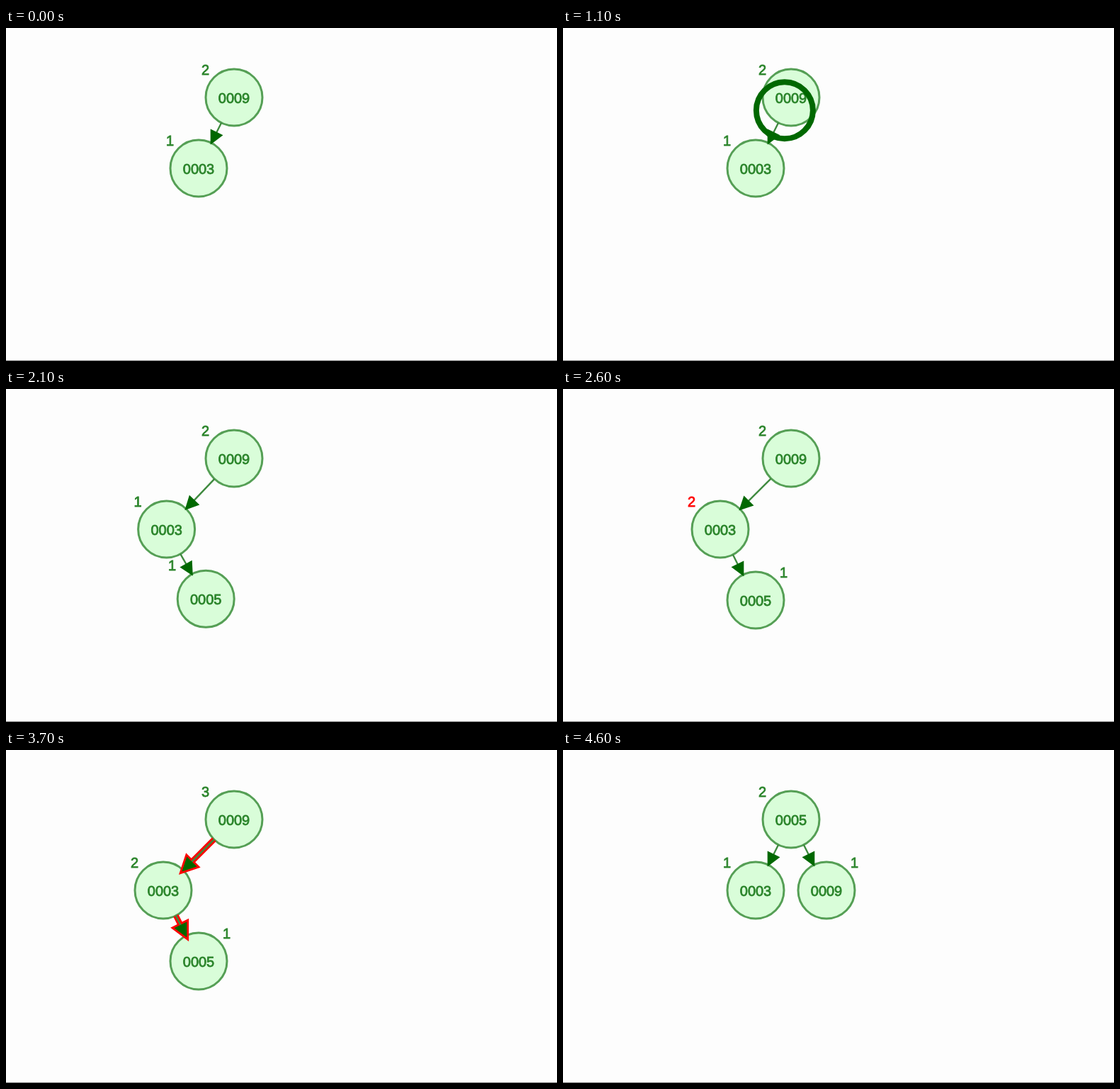
Animation, 778 px wide and 470 px high, one loop 5 s. Source, as an HTML page with a canvas:

```html
<!DOCTYPE html>
<html lang="en">
<head>
<meta charset="utf-8">
<title>Tree insertion with double rotation</title>
<style>
  html, body { margin: 0; width: 100%; height: 100%; overflow: hidden; background: #fdfdfd; }
  canvas { display: block; }
</style>
</head>
<body>
<canvas id="stage" width="778" height="470"></canvas>
<script>
const ctx = document.getElementById('stage').getContext('2d');
const LOOP = 5000, TICK = 100, BLOCK = 367, STEPS = 11, RADIUS = 40;
const PAPER = '#fdfdfd', DARK = '#006800', LINE = '#3f8a3f', OUTLINE = '#559f55',
      FILL = '#d9fdd9', TEXT = '#2a842a', RED = '#ff0000';

// Start of each animation block
const ROOT_LIT = 667, DESCEND = 1033, CHILD_LIT = 1400, INSERT = 1767, CLIMB = 2133,
      CHILD_HEIGHT = 2500, CLIMB_ROOT = 2867, ROOT_HEIGHT = 3233, EDGES_LIT = 3600, ROTATE = 4000;

// Tree slots
const ROOT = [322, 98], LEFT = [272, 198], RIGHT = [372, 198], FAR_LEFT = [222, 198], INNER = [272, 298];
const ENTRY = [-618, 98], LABEL_ENTRY = [-518, 158];

const progress = (t, start) => Math.min(1, Math.max(0, (t - start) / BLOCK));
const during = (t, start) => t >= start && t < start + BLOCK;
const mix = (a, b, p) => a.map((v, i) => v + (b[i] - v) * p);
const labelLeft = ([x, y]) => [x - 40.5, y - 40];
const labelRight = ([x, y]) => [x + 39.5, y - 40];

// The new node is pulled to its first slot and to its final slot in every step.
function insertedAt(p) {
  let pos = ENTRY;
  const count = Math.round(p * STEPS);
  for (let i = 0; i < count; i++) {
    const f = 1 / (STEPS - i);
    pos = mix(mix(pos, [322, 298], f), INNER, f);
  }
  return pos;
}

function write(text, [x, y], color = TEXT) {
  ctx.fillStyle = ctx.strokeStyle = color;
  ctx.lineWidth = 0.8;
  ctx.fillText(text, x, y + 7.5);
  ctx.strokeText(text, x, y + 7.5);
}

function circle([x, y], radius) {
  ctx.beginPath();
  ctx.arc(x, y, radius, 0, Math.PI * 2);
}

function drawNode(pos, text, glow) {
  if (glow) {
    circle(pos, RADIUS + 1 + glow);
    ctx.fillStyle = RED;
    ctx.fill();
  }
  circle(pos, RADIUS);
  ctx.fillStyle = FILL;
  ctx.fill();
  ctx.strokeStyle = OUTLINE;
  ctx.lineWidth = 3;
  ctx.stroke();
  write(text, [pos[0], pos[1] + 0.5]);
}

function strokeArrow(from, to, width, lineColor, headColor) {
  const angle = Math.atan2(to[1] - from[1], to[0] - from[0]);
  ctx.lineWidth = width;
  ctx.strokeStyle = lineColor;
  ctx.beginPath();
  ctx.moveTo(...from);
  ctx.lineTo(...to);
  ctx.stroke();
  ctx.save();
  ctx.translate(...to);
  ctx.rotate(angle);
  ctx.beginPath();
  ctx.moveTo(0, 0);
  ctx.lineTo(-16, -8);
  ctx.lineTo(-16, 8);
  ctx.closePath();
  ctx.fillStyle = ctx.strokeStyle = headColor;
  ctx.fill();
  ctx.stroke();
  ctx.restore();
}

function drawEdge(a, b, lit) {
  const reach = RADIUS / Math.hypot(b[0] - a[0], b[1] - a[1]);
  const from = mix(a, b, reach), to = mix(b, a, reach);
  if (lit) strokeArrow(from, to, 8, RED, RED);
  strokeArrow(from, to, 2.4, LINE, DARK);
}

function drawRing(pos) {
  circle(pos, RADIUS);
  ctx.strokeStyle = DARK;
  ctx.lineWidth = 8;
  ctx.stroke();
}

// Thickness of the red glow: a triangle wave between 6 and 10
function pulse(t) {
  const phase = ((t - 767 + 9330) % 933) / 933;
  return 6 + 4 * Math.abs(1 - 2 * phase);
}

function draw(t) {
  const grow = progress(t, INSERT), turn = progress(t, ROTATE);
  const rotated = t >= ROTATE, inserted = t >= INSERT;
  const nine = mix(ROOT, RIGHT, turn);
  const three = mix(mix(LEFT, FAR_LEFT, grow), LEFT, turn);
  const five = rotated ? mix(INNER, ROOT, turn) : insertedAt(grow);

  ctx.fillStyle = PAPER;
  ctx.fillRect(0, 0, 778, 470);
  ctx.fillStyle = '#808080';
  ctx.fillRect(0, 469, 778, 1);
  ctx.font = '20px "Liberation Sans", Arial, sans-serif';
  ctx.textAlign = 'center';

  drawNode(nine, '0009', during(t, ROOT_LIT) && pulse(t));
  drawNode(three, '0003', during(t, CHILD_LIT) && pulse(t));
  if (inserted) drawNode(five, '0005');

  const lit = t >= EDGES_LIT && !rotated;
  if (rotated) {
    drawEdge(five, three);
    drawEdge(five, nine);
  } else {
    drawEdge(nine, three, lit);
    if (inserted) drawEdge(three, five, lit);
  }

  const nineHeight = rotated ? 1 : t >= ROOT_HEIGHT ? 3 : 2;
  const threeHeight = !rotated && t >= CHILD_HEIGHT ? 2 : 1;
  write(nineHeight, mix(labelLeft(ROOT), labelRight(RIGHT), turn), during(t, ROOT_HEIGHT) ? RED : TEXT);
  write(threeHeight, labelLeft(three), during(t, CHILD_HEIGHT) ? RED : TEXT);
  if (inserted) {
    const settled = mix(LABEL_ENTRY, labelRight(INNER), grow);
    write(rotated ? 2 : 1, mix(settled, labelLeft(ROOT), turn));
  }

  for (const [start, from, to] of [[DESCEND, ROOT, LEFT], [CLIMB, INNER, FAR_LEFT], [CLIMB_ROOT, FAR_LEFT, ROOT]])
    if (during(t, start)) drawRing(mix(from, to, progress(t, start)));
}

function play() {
  const t = performance.now() % LOOP;
  draw(Math.floor(t / TICK) * TICK);
  requestAnimationFrame(play);
}
play();
</script>
</body>
</html>
```
